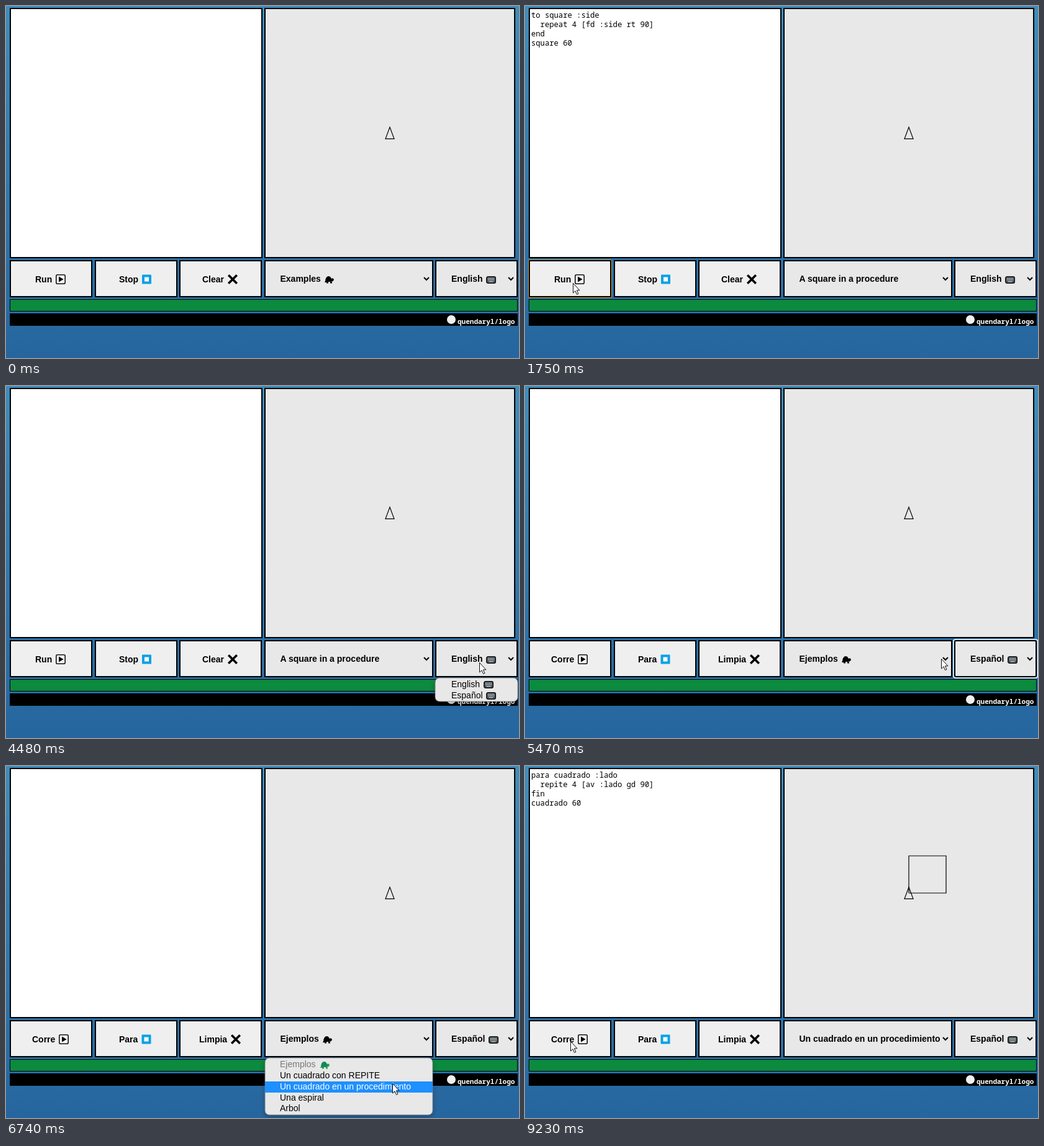
These frames come from a looping animation (826 by 568 pixels, 9.46 s). An HTML page:

```html
<!DOCTYPE html>
<html lang="en">
<head>
<meta charset="utf-8">
<title>Logo interpreter</title>
<style>
  html, body { margin: 0; width: 100%; height: 100%; overflow: hidden; background: #2867a0; }
  svg { display: block; width: 826px; height: 568px; }
  text { font: 14px "Liberation Sans", Arial, sans-serif; white-space: pre; }
  .bold { font-weight: 700; }
  .code { font: 500 12.2px "Noto Sans Mono", "DejaVu Sans Mono", monospace; }
  .footer { font: 700 11px "Noto Sans Mono", "DejaVu Sans Mono", monospace; }
</style>
</head>
<body>
<svg id="stage" viewBox="0 0 826 568" xmlns="http://www.w3.org/2000/svg"></svg>
<script>
const LOOP = 9460;

const LANGS = {
  en: {
    run: ["Run", 47, 80], stop: ["Stop", 182, 219], clear: ["Clear", 316, 357],
    lang: ["English", 773], turtleX: 513, listTurtleX: 509,
    examples: ["Examples", "A square with REPEAT", "A square in a procedure", "A spiral", "Tree"],
    code: ["to square :side", "  repeat 4 [fd :side rt 90]", "end", "square 60"]
  },
  es: {
    run: ["Corre", 42, 85], stop: ["Para", 182, 218.5], clear: ["Limpia", 311, 362],
    lang: ["Español", 777], turtleX: 510, listTurtleX: 506,
    examples: ["Ejemplos", "Un cuadrado con REPITE", "Un cuadrado en un procedimiento", "Una espiral", "Arbol"],
    code: ["para cuadrado :lado", "  repite 4 [av :lado gd 90]", "fin", "cuadrado 60"]
  }
};

const BUTTON_X = { run: 6, stop: 143, clear: 279 };

// Turtle poses while drawing: x, y, heading
const POSES = [[618, 205, 0], [618, 145, 0], [678, 145, 90], [678, 205, 180], [618, 205, 270], [618, 205, 360]];

const START = {
  lang: "en", cursor: null, menu: null, hover: -1, chosen: 0,
  code: false, caret: false, press: null, ring: null, pose: 0
};

// Each step changes part of the state from its time on
const STEPS = [
  [0, {}],
  [250, { cursor: [716, 440] }],
  [500, { cursor: [640, 444], menu: "examples" }],
  [750, { cursor: [585, 490], hover: 1 }],
  [1000, { cursor: [537, 515], hover: 2 }],
  [1260, { menu: null, hover: -1, chosen: 2, code: true, caret: true }],
  [1510, { cursor: [77, 447], press: "run", ring: "run", caret: false }],
  [1750, { press: null }],
  ...draw(2240),
  [3500, { cursor: [210, 446], ring: null }],
  [3750, { cursor: [334, 442], press: "clear", ring: "clear" }],
  [3980, { press: null, ring: null, code: false, caret: true, pose: 0 }],
  [4230, { cursor: [600, 448] }],
  [4480, { cursor: [762, 446], menu: "lang", caret: false }],
  [4720, { cursor: [750, 496], hover: 1 }],
  [4970, { menu: null, hover: -1, lang: "es", chosen: 0, ring: "lang" }],
  [5220, { cursor: [712, 466] }],
  [5470, { cursor: [670, 440] }],
  [5990, { menu: "examples", ring: null }],
  [6240, { cursor: [662, 462] }],
  [6490, { cursor: [642, 492], hover: 1 }],
  [6740, { cursor: [622, 512], hover: 2 }],
  [6990, { menu: null, hover: -1, chosen: 2, code: true, caret: true }],
  [7230, { cursor: [73, 444], press: "run", ring: "run", caret: false }],
  [7480, { press: null }],
  ...draw(7980),
  [9230, { ring: null }]
];

function draw(start) {
  return [1, 2, 3, 4, 5].map(pose => [start + (pose - 1) * 250, { pose }]);
}

const rect = (x, y, w, h, fill, extra = "") =>
  `<rect x="${x}" y="${y}" width="${w}" height="${h}" fill="${fill}" ${extra}/>`;
const path = (d, extra = "") => `<path d="${d}" ${extra}/>`;
const text = (s, x, y, cls = "", fill = "#000") =>
  `<text x="${x}" y="${y}" class="${cls}" fill="${fill}">${s}</text>`;
const at = (x, y, body) => `<g transform="translate(${x} ${y})">${body}</g>`;
const framed = (x, y, w, h, fill, line = 2, rx = 0) =>
  rect(x + line / 2, y + line / 2, w - line, h - line, fill, `stroke="#000" stroke-width="${line}" rx="${rx}"`);

const icons = {
  run: rect(.8, .8, 14.4, 14.4, "#f4f4f4", 'rx="2" stroke="#111" stroke-width="1.6"') + path("M5 3.6L12.6 8 5 12.4Z"),
  stop: rect(0, .5, 15, 15, "#0aa1e6", 'rx="1"') + rect(4, 4.5, 7, 7, "#fff"),
  clear: path("M2.5 2.5L13.5 13.5M13.5 2.5L2.5 13.5", 'stroke="#000" stroke-width="3.6" stroke-linecap="square"'),
  keyboard: rect(.7, .7, 14.6, 10.6, "#4a5358", 'rx="2.5" stroke="#111" stroke-width="1.4"') +
    path("M3 3.5H13M3 6H13", 'stroke="#c4ced2" stroke-width="1.3" stroke-dasharray="1.4 .8"') +
    path("M4.5 8.7H11.5", 'stroke="#c4ced2" stroke-width="1.3"')
};

const turtleIcon = (shell, skin) =>
  path("M10 7Q11 3.5 13.5 4.5 16 6 14 8.5L11 10.5ZM1 9L0 11H3V12.5H6V10H9V12.5H12V9Z", `fill="${skin}"`) +
  path("M1 9.5Q1.5 1 6.5 1 11 1 12 9.5Z", `fill="${shell}"`);

const chevron = x => path(`M${x} 438l4 4 4-4`, 'fill="none" stroke="#000" stroke-width="2"');

function button(name, s, words) {
  const [label, labelX, iconX] = words[name];
  const x = BUTTON_X[name];
  const ring = s.ring === name
    ? rect(x - .5, 409.5, 134, 61, "none", 'stroke="#ffa500" stroke-opacity=".8" rx="1"') : "";
  return ring + framed(x, 410, 133, 60, s.press === name ? "#ffa500" : "#efefef") +
    text(label, labelX, 446, "bold") + at(iconX, 433, icons[name]);
}

function menu(s, words) {
  if (!s.menu) return "";
  const isLang = s.menu === "lang";
  const items = isLang ? ["en", "es"].map(l => LANGS[l].lang[0]) : words.examples;
  const [x, w] = isLang ? [691, 133] : [417, 270];
  const rows = items.map((item, i) => {
    const top = 473 + 18 * i;
    const active = i === s.hover;
    const disabled = !isLang && i === 0;
    const icon = isLang ? at(i ? 773 : 769, top + 3, icons.keyboard)
      : disabled ? at(words.listTurtleX, top + 3, turtleIcon("#12885f", "#21a344")) : "";
    return (active ? rect(x, top, w, 18, "#1e90ff") : "") +
      text(item, x + (isLang ? 26 : 24), top + 13 - (i === 4), "", active ? "#fff" : disabled ? "#777" : "#000") + icon;
  });
  return rect(x, 471, w, 2 + 18 * items.length, "#e8e8e8",
    'rx="7" stroke="#777" stroke-width=".8" filter="url(#shadow)"') + rows.join("");
}

function turtle(pose) {
  const [x, y, heading] = POSES[pose];
  const trail = POSES.slice(0, pose + 1).map(p => p[0] + " " + p[1]).join("L");
  return `<g fill="none" stroke="#000" stroke-width="1.2">` + path("M" + trail) +
    path("M0-9.5L7 9.3H-7Z", `transform="translate(${x} ${y}) rotate(${heading})"`) + "</g>";
}

function editor(s, words) {
  const lines = s.code ? words.code : [""];
  const last = lines.length - 1;
  const caretX = 10 + Math.round(lines[last].length * 7.33);
  return lines.map((line, i) => text(line, 10, 19 + 15 * i, "code")).join("") +
    (s.caret ? rect(caretX, 7 + 15 * last, 1, 15, "#000") : "");
}

function pointer(s) {
  if (!s.cursor) return "";
  const [x, y] = s.cursor;
  const halo = s.press ? `<circle cx="${x}" cy="${y - 1}" r="12" fill="#ffe600" fill-opacity=".6"/>` : "";
  return halo + at(x, y, path("M.5.5V16L4 12.7 6.5 18.5 8.9 17.4 6.4 11.8H11Z", 'fill="#fff" stroke="#111"'));
}

function scene(s) {
  const words = LANGS[s.lang];
  const langRing = s.ring === "lang"
    ? rect(690, 409, 135.5, 62, "none", 'rx="3" stroke="#fff" stroke-width="1.5"') : "";
  return `<defs>
      <linearGradient id="sky" x2="0" y2="1"><stop stop-color="#3f8dbb"/><stop offset="1" stop-color="#26659e"/></linearGradient>
      <filter id="shadow" x="-20%" y="-30%" width="140%" height="190%"><feDropShadow dx="0" dy="4" stdDeviation="4" flood-opacity=".25"/></filter>
    </defs>` +
    rect(0, 0, 826, 568, "url(#sky)") +
    framed(6, 3, 407, 404, "#fff") + editor(s, words) +
    framed(416, 3, 404, 404, "#e8e8e8") + turtle(s.pose) +
    Object.keys(BUTTON_X).map(name => button(name, s, words)).join("") +
    framed(416, 410, 272, 60, "#e8e8e8") + text(words.examples[s.chosen], 441.5, 445, "bold") +
    (s.chosen ? "" : at(words.turtleX, 435, turtleIcon("#000", "#000"))) + chevron(673) +
    langRing + framed(691, 410, 133, 60, "#e8e8e8", 2, s.ring === "lang" ? 2 : 0) +
    text(words.lang[0], 717, 445, "bold") + at(words.lang[1], 436, icons.keyboard) + chevron(809) +
    framed(6, 473, 818, 20, "#0c8a3e", 1) +
    rect(6, 496, 818, 20, "#000") +
    '<circle cx="717" cy="506" r="7" fill="#f0f0f0"/>' + text("quendaryl/logo", 727, 513, "footer", "#fff") +
    menu(s, words) + pointer(s);
}

let state = START;
const states = STEPS.map(([, change]) => (state = { ...state, ...change }));
const stage = document.getElementById("stage");
const begin = performance.now();
let shown = -1;

function tick() {
  const time = (performance.now() - begin) % LOOP;
  const next = STEPS.findLastIndex(([start]) => start <= time);
  if (next !== shown) {
    shown = next;
    stage.innerHTML = scene(states[next]);
  }
  requestAnimationFrame(tick);
}
tick();
</script>
</body>
</html>
```
